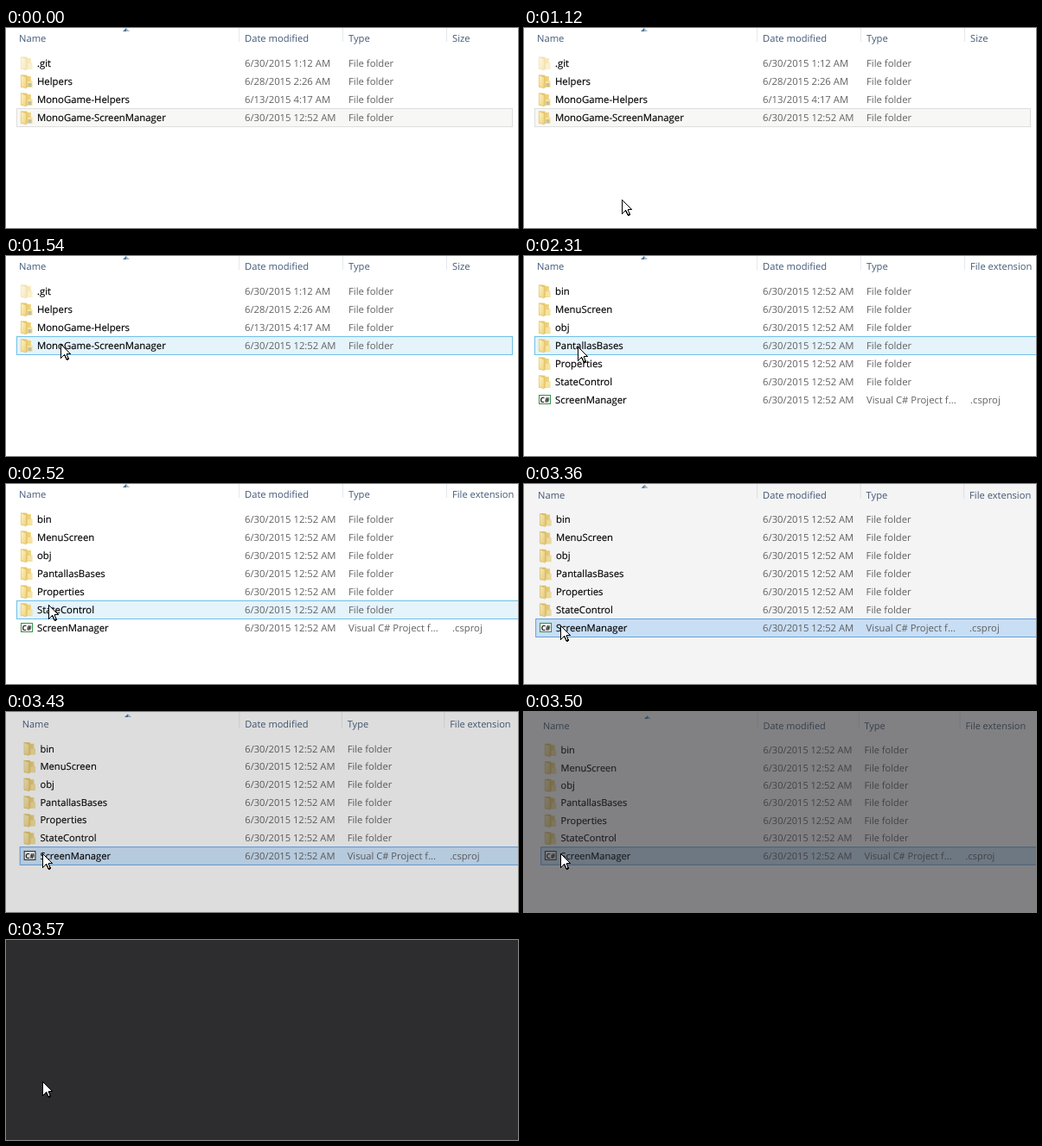
Recreate the animation shown at these times as an HTML page. Size 592 by 232 pixels, loop 6.02 s.

```html
<!DOCTYPE html>
<html lang="en">
<head>
<meta charset="utf-8">
<title>Opening a project</title>
<style>
html, body { margin: 0; width: 100%; height: 100%; overflow: hidden; background: #2d2d30; }
svg { display: block; width: 592px; height: 232px; }
text { font: 11.3px "Open Sans", "Noto Sans", sans-serif; fill: #626262; text-rendering: geometricPrecision; white-space: pre; }
.head { font-size: 11.2px; fill: #435a78; }
.name { font-size: 11.35px; fill: #000; stroke: #000; stroke-width: .15px; }
.tag { font-size: 8.5px; font-weight: 700; fill: #222; }
</style>
</head>
<body>
<svg viewBox="0 0 592 232">
  <defs>
    <linearGradient id="flap" x2="1" y2="1">
      <stop offset="0" stop-color="#fdf3c4"/><stop offset="1" stop-color="#f0d27a"/>
    </linearGradient>
    <linearGradient id="back" x2="1" y2="0">
      <stop offset="0" stop-color="#e3b94f"/><stop offset="1" stop-color="#f3dc90"/>
    </linearGradient>
    <g id="folder">
      <path d="M2 .5H8.5L9.5 2H13.5V7L15 8V15H2Z" fill="url(#back)"/>
      <path d="M9.5 8H14.5V14.5H9.5Z" fill="#f5e3a2"/>
      <path d="M1.8 .8L7.8 3V16L1.8 14Z" fill="url(#flap)" stroke="#e0c06a" stroke-width=".6"/>
    </g>
  </defs>
  <rect width="592" height="232" fill="#2d2d30"/>
  <rect y="231" width="592" height="1" fill="#352c34"/>
  <g id="pane">
    <rect x="-20" y="-20" width="632" height="272" fill="#fff"/>
    <rect id="bar" x="12.5" height="21"/>
    <path d="M269.5 -4V16M389.5 -4V16M509.5 -4V16" stroke="#e3e8ee"/>
    <path d="M135 4L139 0V4Z" fill="#4f7396"/>
    <path d="M139 0L143 4H139Z" fill="#9dbbd3"/>
    <g id="heads"></g>
    <g id="outer"></g>
    <g id="inner"></g>
  </g>
  <path id="arrow" d="M.5 .5V16.5L4.5 12.5L7.5 18.5L9.5 17.5L7.5 13V11.5H11.5Z" fill="#fff" stroke="#000" shape-rendering="crispEdges"/>
</svg>
<script>
const LOOP = 6020, STEP = 70;
const NS = "http://www.w3.org/2000/svg";
const byId = id => document.getElementById(id);
const pane = byId("pane"), bar = byId("bar"), arrow = byId("arrow");
const outer = byId("outer"), inner = byId("inner");

function add(parent, tag, attrs, text = "") {
  const node = document.createElementNS(NS, tag);
  set(node, attrs);
  node.textContent = text;
  parent.append(node);
  return node;
}

function set(node, attrs) {
  for (const key in attrs) node.setAttribute(key, attrs[key]);
}

function label(parent, x, y, text, cls = "") {
  return add(parent, "text", { x, y, class: cls }, text);
}

function folderRow(list, i, name, date, filled) {
  const y = 45 + 21 * i;
  const icon = add(list, "g", { transform: `translate(15.5 ${y - 12})`, opacity: name === ".git" ? 0.5 : 1 });
  add(icon, "use", { href: "#folder" });
  if (filled) add(icon, "rect", { x: 10, y: 10, width: 4, height: 4, fill: "#c3bfa4" });
  label(list, 36, y, name, "name");
  label(list, 276, y, date);
  label(list, 396, y, "File folder");
}

[["Name", 15], ["Date modified", 276], ["Type", 396]]
  .forEach(([text, x]) => label(byId("heads"), x, 16, text, "head"));

label(outer, 516, 16, "Size", "head");
[[".git", "6/30/2015 1:12 AM"], ["Helpers", "6/28/2015 2:26 AM"],
 ["MonoGame-Helpers", "6/13/2015 4:17 AM"], ["MonoGame-ScreenManager", "6/30/2015 12:52 AM"]]
  .forEach(([name, date], i) => folderRow(outer, i, name, date, i > 0));

const stamp = "6/30/2015 12:52 AM";
label(inner, 516, 16, "File extension", "head");
["bin", "MenuScreen", "obj", "PantallasBases", "Properties", "StateControl"]
  .forEach((name, i) => folderRow(inner, i, name, stamp, false));
const frame = add(inner, "rect", { x: 17.5, y: 161.5, width: 13, height: 10, fill: "#fff" });
label(inner, 18.6, 169.7, "C#", "tag");
label(inner, 36, 171, "ScreenManager", "name");
label(inner, 276, 171, stamp);
label(inner, 396, 171, "Visual C# Project f...");
label(inner, 516, 171, ".csproj");

const smooth = p => p * p * (3 - 2 * p);
const mix = (a, b, p) => Math.round(a + (b - a) * p);
const ticks = (t, from) => Math.floor((t - from) / STEP);
const descent = [[62, 105], [58, 114], [53, 127], [49, 140], [44, 152], [42, 159]];

function pointer(t) {
  if (t < 2310) {
    const p = smooth(Math.min(ticks(t, 1120) / 6, 1));
    return [mix(113, 63, p), mix(199, 102, p)];
  }
  if (t < 2800) return descent[Math.min(ticks(t, 2310), 5)];
  return [42, t < 2870 ? 162 : 164];
}

// Opacity and scale of the window as it closes
const closing = [[0.95, 0.996], [0.84, 0.987], [0.4, 0.975], [0, 0.96]];

const looks = {
  idle: { fill: "#f7f7f5", stroke: "#dedede" },
  hover: { fill: "#e5f3fb", stroke: "#70c0e7" },
  chosen: { fill: "#d1e8ff", stroke: "#66a7e8" }
};

function draw(t) {
  const opened = t >= 1890, shown = t >= 1120;
  const [x, y] = pointer(Math.max(t, 1120));
  set(arrow, { transform: `translate(${x} ${y})`, visibility: shown ? "visible" : "hidden" });
  set(outer, { display: opened ? "none" : "inline" });
  set(inner, { display: opened ? "inline" : "none" });

  const over = shown && y < 115;
  const row = opened ? Math.floor((y - 30) / 21) : 3;
  const look = t >= 3080 ? "chosen" : opened || over ? "hover" : "idle";
  set(bar, { y: 30.5 + 21 * row, width: opened ? 600 : 573, ...looks[look] });

  const k = Math.min(ticks(t, 3360), 3);
  const [alpha, scale] = k < 0 ? [1, 1] : closing[k];
  set(pane, { opacity: alpha, transform: `translate(296 167) scale(${scale}) translate(-296 -167)` });
  set(frame, { stroke: k > 0 ? "#222" : "#2f9444" });
}

const start = performance.now();
function tick() {
  draw((performance.now() - start) % LOOP);
  requestAnimationFrame(tick);
}
draw(0);
requestAnimationFrame(tick);
</script>
</body>
</html>
```
